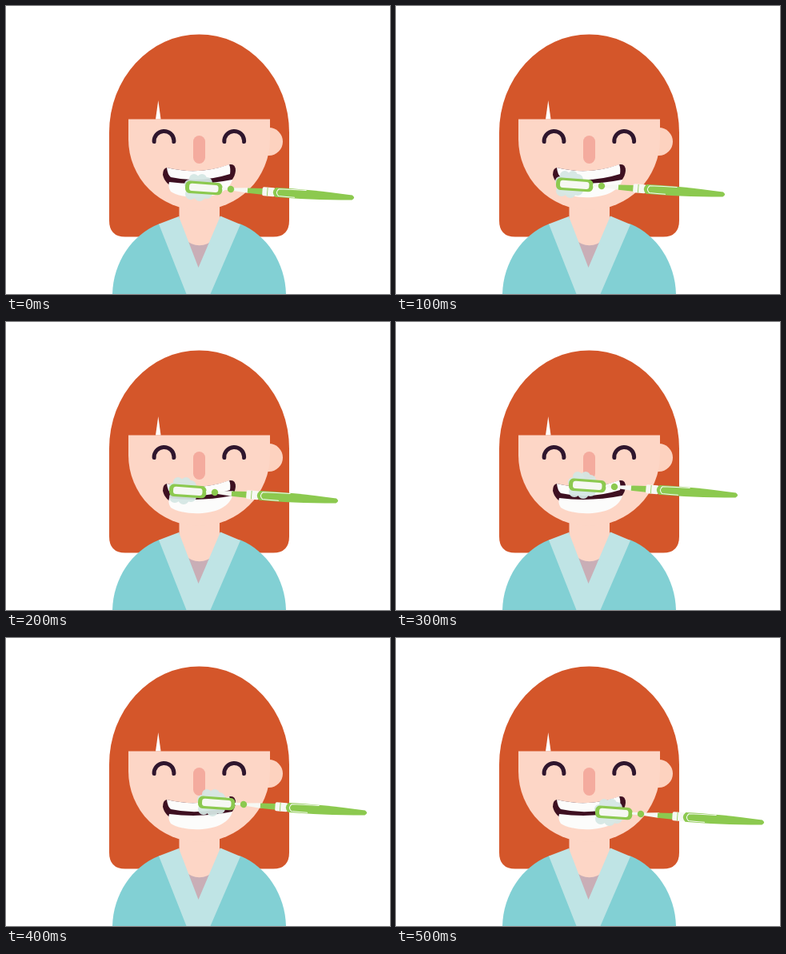
An HTML page with a canvas that plays this animation: 480x360 px, repeating every 600 ms.

```html
<!DOCTYPE html>
<html lang="en">
<head>
<meta charset="utf-8">
<title>Brushing teeth</title>
<style>
  html, body { margin: 0; width: 100%; height: 100%; overflow: hidden; background: #fff; }
  canvas { display: block; width: 480px; height: 360px; }
</style>
</head>
<body>
<canvas id="stage" width="480" height="360"></canvas>
<script>
const ctx = document.getElementById('stage').getContext('2d');
const STEP = 100;
const TILT = 0.069;

// Joint of the brush at each step of its loop around the mouth
const joints = [[281, 229], [257, 225], [261, 213], [273, 206], [297, 208], [306, 220]];

const color = {
  hair: '#d4562a', skin: '#fdd6c6', ear: '#fdd2bf', nose: '#f4ab9e',
  eye: '#2f162d', mouth: '#3e1021', teeth: '#fcfcfb', robe: '#82d0d4',
  lapel: '#bfe4e5', shirt: '#c9aeb6', green: '#8cc94f', white: '#f6f8f3',
  foam: 'rgba(213, 231, 228, 0.94)'
};

function fill(style, path) {
  ctx.fillStyle = style;
  ctx.beginPath();
  path();
  ctx.fill();
}

function poly(style, ...points) {
  fill(style, () => points.forEach(([x, y]) => ctx.lineTo(x, y)));
}

function disc(style, x, y, r) {
  fill(style, () => ctx.arc(x, y, r, 0, Math.PI * 2));
}

function box(style, x, y, w, h, r) {
  fill(style, () => ctx.roundRect(x, y, w, h, r));
}

function drawHair() {
  fill(color.hair, () => {
    ctx.ellipse(241.5, 158, 112.5, 122.5, 0, Math.PI, 0);
    ctx.lineTo(354, 268);
    ctx.quadraticCurveTo(354, 288.5, 334, 288.5);
    ctx.lineTo(149, 288.5);
    ctx.quadraticCurveTo(129, 288.5, 129, 268);
  });
}

function drawBody() {
  fill(color.robe, () => {
    ctx.moveTo(133, 360);
    ctx.bezierCurveTo(134, 321, 157, 286, 191, 272.5);
    ctx.lineTo(293, 272.5);
    ctx.bezierCurveTo(326, 286, 349, 321, 350, 360);
  });
  poly(color.shirt, [216, 263], [268, 263], [240.5, 329]);
  fill(color.skin, () => {
    ctx.moveTo(216.5, 230);
    ctx.lineTo(267, 230);
    ctx.lineTo(267, 274);
    ctx.arc(241.75, 274, 25.25, 0, Math.PI);
  });
  poly(color.lapel, [191, 272.5], [216, 263], [240.5, 327], [268, 262.5],
    [293, 273], [255.5, 360], [225.5, 360]);
}

function drawEye(x) {
  ctx.strokeStyle = color.eye;
  ctx.lineWidth = 5;
  ctx.lineCap = 'round';
  ctx.beginPath();
  ctx.arc(x, 168.8, 12.4, Math.PI * 0.98, Math.PI * 2.02);
  ctx.stroke();
}

function drawFace() {
  disc(color.ear, 328.5, 169.5, 17.5);
  fill(color.skin, () => {
    ctx.moveTo(153, 141.5);
    ctx.lineTo(330, 141.5);
    ctx.lineTo(330, 166.5);
    ctx.arc(241.5, 166.5, 88.5, 0, Math.PI);
  });
  poly('#fff', [190.3, 118], [193.5, 141.5], [187, 141.5]);
  drawEye(197.5);
  drawEye(285.2);
  box(color.nose, 234, 162, 15, 35, 7.5);
}

function drawMouth() {
  fill(color.mouth, () => {
    ctx.moveTo(201, 202);
    ctx.quadraticCurveTo(241, 212, 280, 198);
    ctx.quadraticCurveTo(287, 197, 287, 206);
    ctx.bezierCurveTo(284, 240, 203, 244, 196, 211);
    ctx.quadraticCurveTo(196, 203, 201, 202);
  });
  fill(color.teeth, () => {
    ctx.moveTo(201, 202);
    ctx.quadraticCurveTo(241, 212, 279, 198);
    ctx.quadraticCurveTo(281, 203, 280, 210);
    ctx.quadraticCurveTo(242, 222, 206, 214);
    ctx.quadraticCurveTo(202, 211, 201, 202);
  });
  fill(color.teeth, () => {
    ctx.moveTo(204, 220);
    ctx.quadraticCurveTo(243, 225, 283, 217);
    ctx.bezierCurveTo(276, 244, 222, 243, 206, 232);
    ctx.quadraticCurveTo(202, 226, 204, 220);
  });
}

function drawFoam() {
  fill(color.foam, () => {
    const bubble = (x, y, r) => {
      ctx.moveTo(x + r, y);
      ctx.arc(x, y, r, 0, Math.PI * 2);
    };
    bubble(-46, -13, 6);
    bubble(-36, -13, 6);
    bubble(-52, -6, 6);
    bubble(-30, -8, 7);
    bubble(-40, -3, 14);
    bubble(-50, 6, 7);
    bubble(-39, 8, 7);
    bubble(-30, 5, 7);
  });
}

function drawBrush() {
  ctx.rotate(TILT);
  box(color.green, -57, -7, 46.5, 15.5, 6);
  box(color.white, -52, -3.8, 36.5, 9.2, 3.5);
  box(color.white, -11, -1.5, 10, 3, 1);
  poly(color.white, [2, -1.7], [23, -3.3], [23, 3.3], [2, 1.7]);
  disc(color.green, 0, 0, 4.2);
  poly(color.green, [21, -3], [40, -3.7], [40, 4], [21, 3.2]);

  box(color.white, 39.5, -5.5, 16, 11, 2);
  box(color.green, 45.5, -5.2, 0.8, 10.4, 0);

  fill(color.green, () => {
    ctx.moveTo(56, -5.8);
    ctx.quadraticCurveTo(95, -6.5, 152, -3);
    ctx.quadraticCurveTo(157, 0, 152, 3);
    ctx.quadraticCurveTo(95, 6.8, 56, 5.8);
    ctx.quadraticCurveTo(50, 0, 56, -5.8);
  });
  ctx.strokeStyle = color.white;
  ctx.lineWidth = 1.1;
  ctx.beginPath();
  ctx.moveTo(94, -5);
  ctx.quadraticCurveTo(78, -5, 60, -4.4);
  ctx.quadraticCurveTo(55, 0, 60, 4.4);
  ctx.quadraticCurveTo(70, 4.9, 80, 4.8);
  ctx.stroke();
}

function draw(now) {
  const [x, y] = joints[Math.floor(now / STEP) % joints.length];
  ctx.fillStyle = '#fff';
  ctx.fillRect(0, 0, 480, 360);
  drawHair();
  drawBody();
  drawFace();
  drawMouth();
  ctx.save();
  ctx.translate(x, y);
  drawFoam();
  drawBrush();
  ctx.restore();
}

function tick() {
  draw(performance.now());
  requestAnimationFrame(tick);
}
tick();
</script>
</body>
</html>
```
